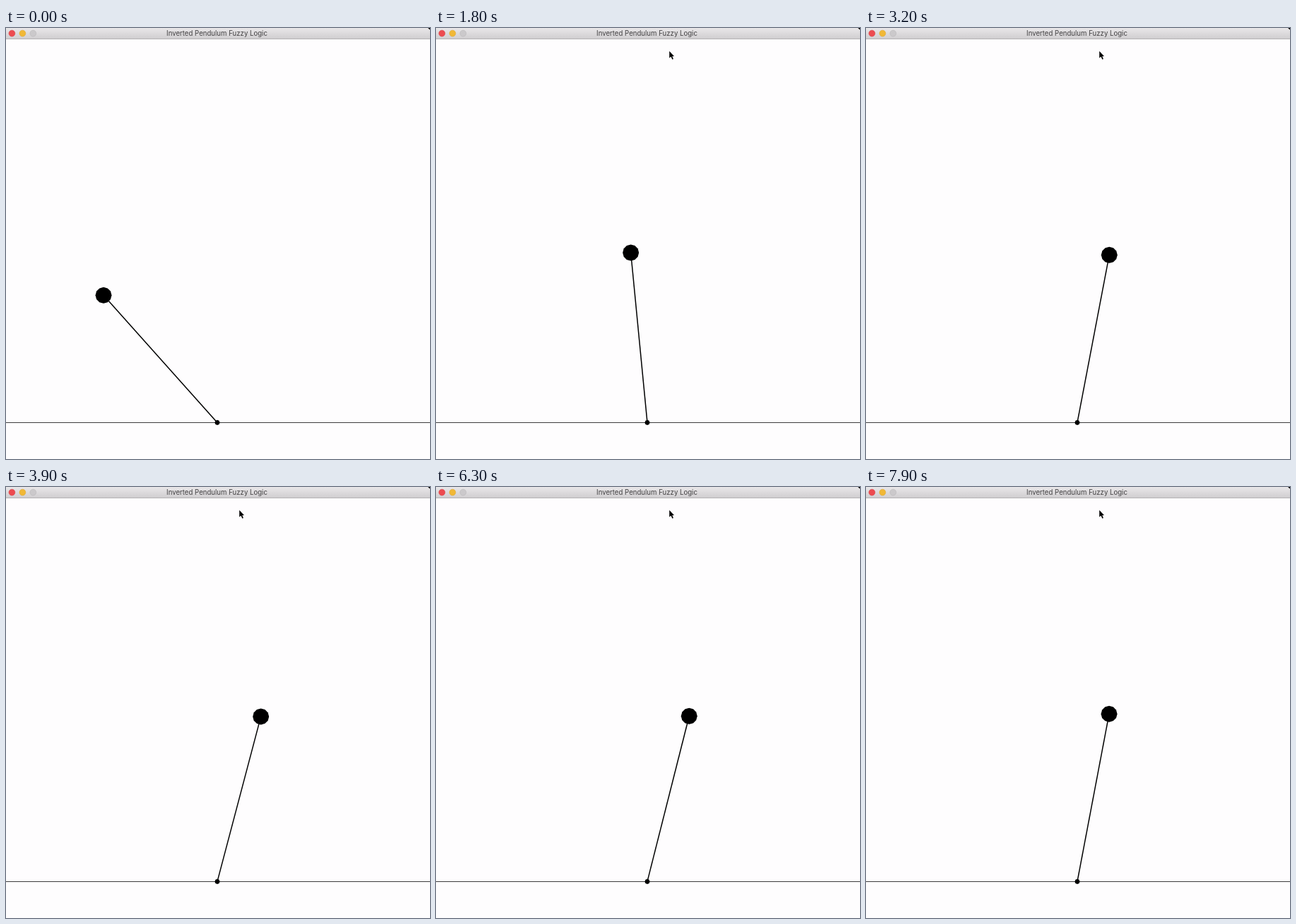
Recreate the animation shown at these times as an HTML page with a canvas. Size 600 by 610 pixels, loop 8 s.

```html
<!DOCTYPE html>
<html lang="en">
<head>
<meta charset="utf-8">
<title>Inverted Pendulum Fuzzy Logic</title>
<style>
  html, body { margin: 0; width: 100%; height: 100%; overflow: hidden; background: #fefdfe; }
  canvas { display: block; }
</style>
</head>
<body>
<canvas id="stage" width="600" height="610"></canvas>
<script>
const ctx = document.getElementById('stage').getContext('2d');
const LOOP = 8000, STEP = 100;
const PIVOT = { x: 299, y: 558.4 }, ROD = 241.5;
const CURSOR_FROM = 400;

// Swing from the left, overshoot, slow return: [time in ms, degrees from upright]
const SWING = [
  [0, -41.8], [1000, -19.8], [2600, 5.35], [3900, 14.8],
  [4500, 15.95], [5300, 15.9], [6300, 14.2], [7900, 10.75]
];

function slope(i) {
  const [t0, a0] = SWING[i], [t1, a1] = SWING[i + 1];
  return (a1 - a0) / (t1 - t0);
}

// Harmonic mean of the neighbouring slopes keeps the curve free of overshoot.
function tangent(i) {
  const a = slope(Math.max(i - 1, 0));
  const b = slope(Math.min(i, SWING.length - 2));
  return a * b > 0 ? 2 * a * b / (a + b) : 0;
}

function angleAt(t) {
  const i = Math.min(SWING.findLastIndex(([start]) => start <= t), SWING.length - 2);
  const [t0, a0] = SWING[i], [t1, a1] = SWING[i + 1];
  const h = t1 - t0, s = (t - t0) / h, r = 1 - s;
  const degrees = a0 * r * r * (1 + 2 * s) + a1 * s * s * (1 + 2 * r)
    + h * s * r * (tangent(i) * r - tangent(i + 1) * s);
  return degrees * Math.PI / 180;
}

function polygon(points, color) {
  ctx.beginPath();
  points.forEach(([x, y]) => ctx.lineTo(x, y));
  ctx.closePath();
  ctx.fillStyle = color;
  ctx.fill();
}

function disc(x, y, radius, sides) {
  const points = Array.from({ length: sides }, (_, i) => {
    const a = i * 2 * Math.PI / sides;
    return [x + radius * Math.cos(a), y + radius * Math.sin(a)];
  });
  polygon(points, '#000');
}

function light(x, fill, stroke) {
  ctx.beginPath();
  ctx.arc(x, 7.6, 4.4, 0, 2 * Math.PI);
  ctx.fillStyle = fill;
  ctx.fill();
  ctx.lineWidth = 0.6;
  ctx.strokeStyle = stroke;
  ctx.stroke();
}

function drawWindow() {
  ctx.fillStyle = '#fefdfe';
  ctx.fillRect(0, 0, 600, 610);
  const bar = ctx.createLinearGradient(0, 0, 0, 15);
  bar.addColorStop(0, '#e9e7e9');
  bar.addColorStop(1, '#d0ced0');
  ctx.fillStyle = bar;
  ctx.fillRect(0, 0, 600, 15);
  ctx.fillStyle = '#b5b3b5';
  ctx.fillRect(0, 15, 600, 1);
  polygon([[597, 0], [600, 0], [600, 2.5]], '#000');
  light(8.4, '#ed4b50', '#dc3f45');
  light(23.4, '#f1b836', '#dfa62c');
  light(38.3, '#cbc9cb', '#bbb9bb');
  ctx.fillStyle = '#424042';
  ctx.font = '9.65px Inter, sans-serif';
  ctx.textAlign = 'center';
  ctx.fillText('Inverted Pendulum Fuzzy Logic', 298.5, 11.3);
}

function drawPendulum(angle) {
  const x = PIVOT.x + ROD * Math.sin(angle);
  const y = PIVOT.y - ROD * Math.cos(angle);
  ctx.fillStyle = '#3c3c3c';
  ctx.fillRect(0, 558, 600, 1);
  ctx.beginPath();
  ctx.moveTo(PIVOT.x, PIVOT.y);
  ctx.lineTo(x, y);
  ctx.lineWidth = 1.5;
  ctx.strokeStyle = '#000';
  ctx.stroke();
  disc(PIVOT.x, PIVOT.y, 3.6, 8);
  disc(x, y, 11.5, 12);
}

function drawCursor() {
  polygon([[330.2, 32.7], [330.2, 42.6], [332.5, 40.6], [334.3, 44.6],
    [335.9, 43.9], [334.3, 40.1], [337, 39.9]], '#000');
}

function frame() {
  const t = Math.floor(performance.now() % LOOP / STEP) * STEP;
  drawWindow();
  drawPendulum(angleAt(t));
  if (t >= CURSOR_FROM) drawCursor();
  requestAnimationFrame(frame);
}
frame();
</script>
</body>
</html>
```
